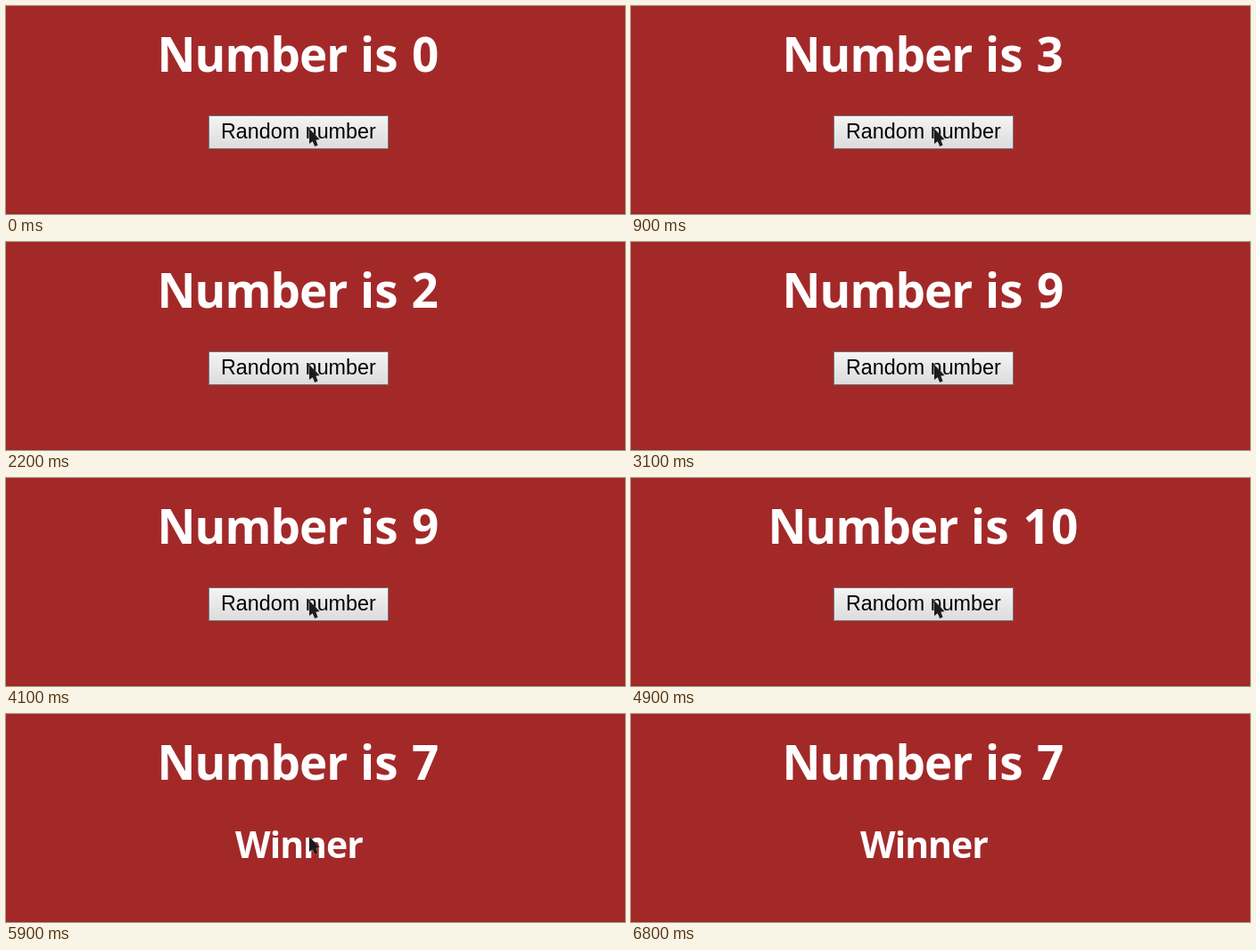
An HTML page with a canvas for the animation above (7.1 s loop, 694 by 234 pixels).

```html
<!DOCTYPE html>
<html lang="en">
<head>
<meta charset="utf-8">
<title>Random number</title>
<style>
html, body { margin: 0; width: 100%; height: 100%; overflow: hidden; background: #a32929; }
canvas { display: block; }
</style>
</head>
<body>
<canvas id="stage" width="694" height="234"></canvas>
<script>
const ctx = document.getElementById('stage').getContext('2d');
const LOOP = 7100, TICK = 100, WIN = 5900, LEAVE = 6500, GONE = 6800;
const HEAD = '"Open Sans", "Noto Sans", sans-serif';

const results = [0, 6, 3, 9, 8, 2, 5, 9, 3, 9, 4, 10, 5, 7];
const holds = [400, 1700, 3500, 4500, 5400];

// Three runs of evenly spaced clicks
const run = (first, gap, count) => Array.from({ length: count }, (_, i) => first + i * gap);
const clicks = [...run(500, 433, 7), ...run(3600, 500, 3), ...run(4900, 500, 3)]
  .map(time => Math.round(time / TICK - 0.2) * TICK);

const heldSince = t => holds.find(h => t >= h && t < h + TICK);

// A new number appears only once the button is let go
function numberAt(t) {
  const held = heldSince(t);
  const seen = held === undefined ? t : held - 1;
  return results[clicks.filter(c => c <= seen).length];
}

function pointerAt(t) {
  const step = Math.max(0, Math.floor((t - LEAVE) / TICK) + 1);
  const away = (step / 3) ** 1.5;
  return [340 - 201 * away, 138 - 120 * away];
}

function setFont(font, spacing, color) {
  ctx.font = font;
  ctx.letterSpacing = spacing;
  ctx.fillStyle = color;
}

// Places the visible left edge of the text at x
function inkText(text, x, y) {
  ctx.fillText(text, x + ctx.measureText(text).actualBoundingBoxLeft, y);
}

function inkCentered(text, x, y) {
  const m = ctx.measureText(text);
  ctx.fillText(text, x + (m.actualBoundingBoxLeft - m.actualBoundingBoxRight) / 2, y);
}

function drawTitle(number) {
  const digits = String(number);
  const shift = (digits.length - 1) * 16;
  setFont('700 53px ' + HEAD, '-1px', '#fff');
  inkText('Number', 173.5 - shift, 74);
  ctx.letterSpacing = '0px';
  inkText('is', 400 - shift, 74);
  [...digits].reverse().forEach((d, i) => inkCentered(d, 470 + shift - i * 34, 74));
}

function drawButton(pressed) {
  const shades = ['#f4f4f4', '#dcdcdc'];
  if (pressed) shades.reverse();
  const fill = ctx.createLinearGradient(0, 124, 0, 160);
  shades.forEach((shade, i) => fill.addColorStop(i, shade));
  ctx.fillStyle = pressed ? '#929292' : '#737373';
  ctx.fillRect(227, 123, 202, 38);
  ctx.fillStyle = fill;
  ctx.fillRect(228, 124, 200, 36);
  setFont('23.33px "Liberation Sans", Arial, sans-serif', '0px', '#000');
  ctx.fillText('Random number', 241, 149);
}

function drawWinner() {
  setFont('700 41px ' + HEAD, '-1px', '#fff');
  inkText('Winner', 257, 162);
}

function drawPointer([x, y]) {
  const shape = [[0, 0], [0, 17], [3.8, 14.2], [6.2, 20], [9.6, 18.6], [7.4, 12.8], [11.6, 12]];
  ctx.beginPath();
  shape.forEach(([dx, dy]) => ctx.lineTo(x + dx, y + dy));
  ctx.closePath();
  ctx.lineJoin = 'round';
  ctx.strokeStyle = 'rgba(220, 220, 220, 0.4)';
  ctx.stroke();
  ctx.fillStyle = '#1c1c1c';
  ctx.fill();
}

function draw(t) {
  ctx.fillStyle = '#a32929';
  ctx.fillRect(0, 0, 694, 234);
  ctx.fillStyle = '#962727';
  ctx.fillRect(0, 233, 694, 1);
  drawTitle(numberAt(t));
  if (t < WIN) drawButton(heldSince(t) !== undefined);
  else drawWinner();
  if (t < GONE) drawPointer(pointerAt(t));
}

const start = performance.now();
function frame() {
  draw((performance.now() - start) % LOOP);
  requestAnimationFrame(frame);
}
frame();
</script>
</body>
</html>
```
